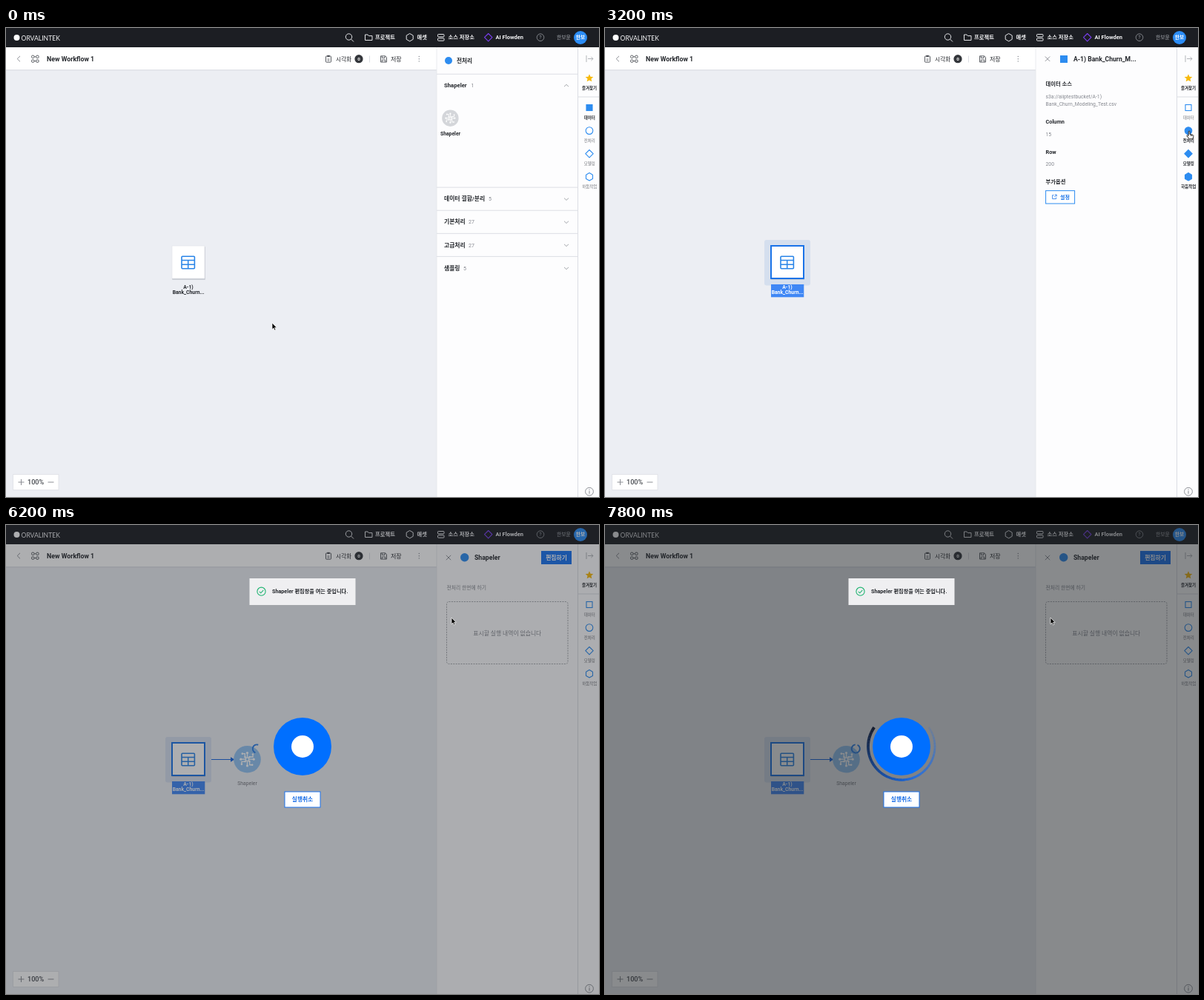
An HTML page that plays this animation: 800x633 px, repeating every 8000 ms.

```html
<!DOCTYPE html>
<html lang="ko">
<head>
<meta charset="utf-8">
<title>Workflow</title>
<style>
html, body { margin: 0; width: 100%; height: 100%; overflow: hidden; background: #eceef3; }
svg { display: block; width: 100vw; height: 100vh; }
text { font-family: Roboto, "Noto Sans CJK KR", "Noto Sans CJK JP", "Noto Sans CJK", sans-serif; white-space: pre; }
</style>
</head>
<body>
<svg id="stage" viewBox="0 0 800 633"></svg>
<script>
const BLUE = '#2d8cf0', DEEP = '#1a73e8', INK = '#24272c', GRAY = '#85888f', LINE = '#dcdee4';
const LOOP = 8000, STEP = 200;
const T = { hover: 1000, select: 1400, leave: 2600, open: 3800, suggest: 4000, tip: 5000, load: 6200, spin: 6400 };
const TOOL = 'Shapeler';

// Markup helpers
const text = (x, y, s, size, fill = INK, weight = 400, anchor = 'start') =>
  `<text x="${x}" y="${y}" font-size="${size}" fill="${fill}" font-weight="${weight}" text-anchor="${anchor}">${s}</text>`;
const bold = (x, y, s, size = 7.7, fill = INK, anchor) => text(x, y, s, size, fill, 700, anchor);
const rect = (x, y, w, h, fill, more = '') =>
  `<rect x="${x}" y="${y}" width="${w}" height="${h}" fill="${fill}" ${more}/>`;
const dot = (x, y, r, fill, more = '') => `<circle cx="${x}" cy="${y}" r="${r}" fill="${fill}" ${more}/>`;
const path = (d, stroke, w = 1, fill = 'none', more = '') =>
  `<path d="${d}" stroke="${stroke}" stroke-width="${w}" fill="${fill}" ${more}/>`;
const line = (c, w = 1) => `stroke="${c}" stroke-width="${w}"`;
const group = (id, body, more = '') => `<g id="${id}" ${more}>${body}</g>`;
const poly = (x, y, r, n, stroke, fill = 'none', w = 1) => {
  const pts = Array.from({ length: n }, (_, i) => {
    const a = i * 2 * Math.PI / n - Math.PI / 2;
    return `${(x + r * Math.cos(a)).toFixed(2)} ${(y + r * Math.sin(a)).toFixed(2)}`;
  });
  return path(`M${pts.join('L')}Z`, stroke, w, fill, 'stroke-linejoin="round"');
};
const cross = (x, y, r, c) => path(`M${x - r} ${y - r}l${2 * r} ${2 * r}m0 ${-2 * r}l${-2 * r} ${2 * r}`, c, .9);

// Small node lattice used for the tool
function lattice(x, y, s) {
  let out = '';
  for (let i = 0; i < 4; i++) {
    out += `<g transform="translate(${x} ${y}) rotate(${i * 90}) scale(${s})">` +
      path('M0 -1.6V-5.5M2.2 -2.2H5.2V-4', '#fff', .9) +
      dot(0, -6, 1.1, '#fff') + dot(5.2, -4.6, .9, '#fff') + dot(2, -2, .9, '#fff') + '</g>';
  }
  return out + rect(x - 1.4 * s, y - 1.4 * s, 2.8 * s, 2.8 * s, 'none', line('#fff', .8 * s));
}

function header() {
  const w = '#e4e5e8';
  return rect(0, 0, 800, 26, '#1c1e23') +
    dot(14.5, 13, 4, '#fff') +
    `<text x="20.5" y="16.8" font-size="8.6" fill="#f4f4f6" style="font-family:Lato,sans-serif">ORVALINTEK</text>` +
    dot(462.5, 12, 4.2, 'none', line(w)) + path('M465.6 15.1l3.4 3.4', w) +
    path('M484.5 16.5v-7.5h3.5l1.4 1.6h4.6v5.9z', w, 1, 'none', 'stroke-linejoin="round"') +
    bold(498, 15.2, '프로젝트', 7.3, '#f4f4f6') +
    poly(544.7, 12.7, 5.2, 6, w) + bold(554.5, 15.2, '애셋', 7.3, '#f4f4f6') +
    rect(582.5, 8.5, 8.5, 3.4, 'none', `rx=".8" ${line(w)}`) +
    rect(582.5, 13.8, 8.5, 3.4, 'none', `rx=".8" ${line(w)}`) +
    bold(596.5, 15.2, '소스 저장소', 7.3, '#f4f4f6') +
    poly(650.7, 12.7, 5.2, 4, '#7a3ff0', 'none', 1.1) + bold(660.5, 15.2, 'AI Flowden', 7.5, '#f4f4f6') +
    dot(721, 12.7, 4.8, 'none', line('#8b8e94', .9)) + text(721, 15.2, '?', 7, '#8b8e94', 400, 'middle') +
    text(743, 15.2, '한보윤', 6.8, '#a4a7ad') +
    dot(775, 13, 9, '#2b8cf5') + bold(775, 15.3, '한보', 6.7, '#fff', 'middle');
}

function toolbar() {
  const g = '#4a4d53';
  let boxes = '';
  for (const [x, y] of [[36.3, 38.8], [42.4, 38.8], [36.3, 44.6], [42.4, 44.6]])
    boxes += rect(x - 1.7, y - 1.7, 3.4, 3.4, 'none', `rx="1.2" ${line(g, .9)}`);
  return rect(0, 26, 581, 31, '#fff') + rect(0, 56.3, 581, 1, '#d5d8df') +
    path('M19 37.8l-3.8 3.8 3.8 3.8', '#8b8e94') + boxes + path('M38 38.8h2.6M38 44.6h2.6', g, .8) +
    bold(55, 44.7, 'New Workflow 1', 8.8) +
    rect(431.5, 38, 7, 8.2, 'none', `rx=".8" ${line(g, .9)}`) + rect(433.3, 36.8, 3.4, 2.2, g) +
    path('M433.5 42h3M433.5 44h3', g, .8) + text(445, 44.5, '시각화', 7.6, INK, 500) +
    dot(476, 41.7, 5.6, '#33363b') + bold(476, 44, '0', 6.2, '#fff', 'middle') +
    rect(490, 37.5, 1, 9, LINE) +
    path('M505.5 37.8h6.2l1.8 1.8v6.4h-8zM507.3 38v2.4h3.8v-2.4M507.3 46v-3h4.4v3', g, .9) +
    text(519, 44.5, '저장', 8, INK, 500) +
    dot(557.3, 38.5, .7, GRAY) + dot(557.3, 41.7, .7, GRAY) + dot(557.3, 44.9, .7, GRAY) +
    rect(9.5, 602.5, 61.5, 21, '#fff', line('#e2e4e9')) +
    path('M16.5 613h8M20.5 609v8M56.5 613h8', '#8b8e94') + text(29, 616.2, '100%', 9.1, '#45484e', 500);
}

function dataNode() {
  return group('halo', rect(215, 286, 62, 61.5, '#d5dfee', 'rx="3"')) +
    rect(224, 295, 45, 45, '#b9bdc6', 'opacity=".65" rx="1"') +
    rect(224, 294, 44, 44, '#fff', 'id="card"') +
    rect(237, 308.2, 17.4, 16.6, 'none', `rx="1" ${line('#2a85e8', 1.6)}`) +
    path('M237 313.4h17.4M237 319.2h17.4M245.7 313.4v11.4', '#2a85e8', 1.5) +
    group('ports', rect(224.3, 313.3, 2.8, 6.4, '#fff', line('#5b9ff0', .8)) +
      rect(265, 313.3, 2.8, 6.4, '#fff', line('#5b9ff0', .8))) +
    group('plate', rect(224, 346, 44.3, 17.3, '#3f87f5')) +
    group('caption', bold(246, 352, 'A-1)', 6.8, 'inherit', 'middle') + bold(246, 358.9, 'Bank_Churn...', 6.8, 'inherit', 'middle'));
}

const edge = c => path('M269 316.5h35', c, 1.2) + path('M303 313.2l5.3 3.3-5.3 3.3z', 'none', 0, c);

function nextNodes() {
  const disc = dot(325.5, 316.2, 18.3, '#92c3f2');
  return group('ghost', edge('#a2a5aa') + disc +
      rect(319.3, 308.8, 12.4, 5.6, 'none', `rx="1" ${line('#fff', 1.2)}`) +
      path('M327 318.2h-6.7q-1 0-1 1v3.6q0 1 1 1h6.2', '#fff', 1.2) + cross(331, 321.8, 2.2, '#fff')) +
    group('added', edge('#1565e0') + disc + lattice(325.5, 316.2, 1.45) +
      text(325.5, 351.3, TOOL, 6.8, '#73767c', 400, 'middle') +
      path('', '#2b7fe8', 1.9, 'none', 'id="busy"'));
}

function toolPanel() {
  const rows = [['데이터 결합/분리', 5, 651], ['기본처리', 27, 624], ['고급처리', 27, 624], ['샘플링', 5, 617]];
  const chev = (y, d) => path(`M753 ${y - d}l3 ${2 * d} 3 ${-2 * d}`, '#9a9da3', .9);
  let out = dot(597, 44, 5, BLUE) + bold(608, 46.7, '전처리', 7.6) + rect(581, 61.7, 190, 1, LINE) +
    bold(591, 80.2, TOOL) + text(627.5, 80.2, 1, 7, GRAY) + chev(77.7, -1.4) +
    dot(599.4, 121.7, 11.2, '#d4d6da', 'id="toolDisc"') + lattice(599.4, 121.7, 1) +
    bold(599.5, 144.5, TOOL, 6.8, INK, 'middle');
  rows.forEach(([name, n, x], i) => {
    const y = 215 + i * 31.1;
    out += rect(581, y - .4, 190, 1, LINE) + bold(591, y + 18.3, name, 7.8) +
      text(x, y + 18.3, n, 7, GRAY) + chev(y + 16, 1.4);
  });
  return out;
}

function dataPanel() {
  const fields = [['데이터 소스', 78], ['Column', 129], ['Row', 169.6], ['부가옵션', 210]];
  const values = [['s3a://aiiptestbucket/A-1)', 95], ['Bank_Churn_Modeling_Test.csv', 105.2], ['15', 145.6], ['200', 186.3]];
  return cross(597, 41.7, 3.2, GRAY) + rect(614, 37, 10, 10, BLUE) + bold(632, 44.7, 'A-1) Bank_Churn_M...', 8.6) +
    fields.map(([s, y]) => bold(594.5, y, s, 7.3)).join('') +
    values.map(([s, y]) => text(594.5, y, s, 6.8, GRAY)).join('') +
    rect(594.6, 219.6, 39, 17.4, '#fff', line(BLUE)) +
    path('M605.6 225.6h-2v5h5v-2M606.4 228l2.6-2.7M606.8 225h2.4v2.4', DEEP, .8) + bold(614, 230.7, '설정', 7, DEEP);
}

function editPanel() {
  return cross(597, 44, 3.2, GRAY) + dot(618.7, 43.8, 5.7, BLUE) + bold(632, 46.8, TOOL, 8.7) +
    rect(722, 35, 41, 18, '#1a73f0') + bold(742.5, 46.8, '편집하기', 7.8, '#fff', 'middle') +
    text(594.5, 87.4, '전처리 한번에 하기', 6.8, GRAY) +
    rect(594.5, 103.5, 163.5, 84, 'none', `rx="3" stroke-dasharray="2 1.4" ${line('#9a9da3', .9)}`) +
    text(676.3, 148.7, '표시할 실행 내역이 없습니다', 7.8, GRAY, 400, 'middle');
}

function sidebar() {
  let star = 'M';
  for (let i = 0; i < 10; i++) {
    const a = i * Math.PI / 5 - Math.PI / 2, r = i % 2 ? 2.6 : 5.6;
    star += `${i ? 'L' : ''}${(787 + r * Math.cos(a)).toFixed(2)} ${(67.8 + r * Math.sin(a)).toFixed(2)}`;
  }
  return rect(771, 26, 1, 607, LINE) +
    path('M783 37v9M785 41.5h7M789.4 38.9l2.6 2.6-2.6 2.6', '#a9acb2', .9) +
    path(star + 'Z', 'none', 0, '#f7b90c') + bold(787, 82.6, '즐겨찾기', 5.5, INK, 'middle') +
    rect(772, 92.5, 28, 1, LINE) + group('kinds', '') +
    dot(787, 625.7, 5.4, 'none', line(GRAY, .9)) + path('M787 624.7v4M787 622.4v1.2', GRAY);
}

function kinds(on) {
  const names = ['데이터', '전처리', '모델링', '하둡작업'];
  return names.map((name, i) => {
    const y = 107.5 + 31.1 * i, fill = on[i] ? BLUE : '#fff';
    const shape = i === 0 ? rect(783, y - 4, 8, 8, fill, line(BLUE, 1.1))
      : i === 1 ? dot(787, y, 4.8, fill, line(BLUE, 1.1))
      : poly(787, y, 5.2, i === 2 ? 4 : 6, BLUE, fill, 1.1);
    return shape + text(787.3, y + 15.4, name, 5.5, on[i] ? INK : '#6f7278', on[i] ? 700 : 400, 'middle');
  }).join('');
}

function overlays() {
  return group('tip', path('M600 161.5l3-4.5 3 4.5z', 'none', 0, '#30363b') + rect(558, 161, 94, 31, '#30363b') +
      text(564.5, 173.7, '전처리 한번에 하기', 6.8, '#dfe1e4')) +
    rect(0, 0, 800, 633, '#212529', 'id="dim"') +
    group('loader', rect(328.5, 72, 143, 36, '#efeff1') + dot(344.5, 89.7, 5.6, 'none', line('#22b573', 1.1)) +
      path('M341.8 89.8l2 2 3.5-3.9', '#22b573', 1.1) +
      bold(359, 92.3, TOOL + ' 편집창을 여는 중입니다.', 7.2) +
      group('ring', '') + dot(400, 299, 39, '#006fff') + dot(400, 299, 15, '#fff') +
      rect(376, 360, 48, 21, '#fff', line('#1a73f0')) + bold(400, 373.4, '실행취소', 7.7, '#1a6fe8', 'middle'));
}

const cursors =
  group('arrow', path('M0 0V8.8L2 7 3.4 10 4.9 9.3 3.5 6.4H6.2Z', '#fff', .7, '#000')) +
  group('hand', path('M-.8 .5C-.8 -.8 1 -.8 1 .5V4L4.6 4.7C5.7 5 6 5.6 5.8 6.8L5 10.3H.5L-3 6.4C-3.4 5.3-2.2 4.8-1.6 5.5L-.8 6.2ZM2.4 4.4v1.8M4 4.7v1.6', '#111', .9, '#fff'));

const stage = document.getElementById('stage');
stage.innerHTML = rect(0, 0, 800, 633, '#eceef3') + toolbar() + nextNodes() + dataNode() +
  rect(581, 26, 219, 607, '#fdfdfe') + rect(580.6, 26, .8, 607, '#e3e5ea') + header() +
  group('tools', toolPanel()) + group('info', dataPanel()) + group('edit', editPanel()) + sidebar() +
  overlays() + group('cursor', cursors);

const el = Object.fromEntries([...stage.querySelectorAll('[id]')].map(e => [e.id, e]));
const show = (id, on) => { el[id].style.display = on ? '' : 'none'; };
const at = (cx, cy, r, deg) => {
  const a = deg * Math.PI / 180;
  return `${(cx + r * Math.cos(a)).toFixed(2)} ${(cy + r * Math.sin(a)).toFixed(2)}`;
};
const arc = (cx, cy, r, a, b) => `M${at(cx, cy, r, a)}A${r} ${r} 0 ${b - a > 180 ? 1 : 0} 1 ${at(cx, cy, r, b)}`;

// Tail of the loading ring fades from navy to clear blue
function ring(head) {
  const n = 50, sweep = 250;
  let out = '';
  for (let i = 0; i < n; i++) {
    const k = i / n, m = Math.min(1, k * 1.7), end = head - k * sweep;
    const mix = (a, b) => Math.round(a + (b - a) * m);
    const alpha = k < .5 ? 1 : 1 - (k - .5) * 1.8;
    out += path(arc(400, 299, 45, end - sweep / n - .3, end), `rgb(${mix(22, 26)},${mix(30, 108)},${mix(48, 232)})`,
      4 - 1.5 * k, 'none', `opacity="${alpha.toFixed(2)}"`);
  }
  return out;
}

// Pointer moves: start, end, target
const moves = [[200, 1000, 252.5, 319], [2400, 3200, 788, 139.5], [4000, 5200, 601, 125]];
function pointer(t) {
  let x = 359, y = 398;
  for (const [a, b, tx, ty] of moves) {
    const k = Math.max(0, Math.min(1, (t - a) / (b - a))), e = k * k * (3 - 2 * k);
    x += (tx - x) * e;
    y += (ty - y) * e;
  }
  return [x, y];
}

function draw(t) {
  const picked = t >= T.select, opened = t >= T.open, loading = t >= T.load, spinning = t >= T.spin;
  show('halo', picked);
  show('plate', picked);
  show('ports', t >= T.hover && t < T.leave);
  el.card.setAttribute('stroke', picked ? DEEP : '#dfe2e8');
  el.card.setAttribute('stroke-width', picked ? 2 : .6);
  el.caption.setAttribute('fill', picked ? '#fff' : INK);
  el.caption.querySelectorAll('text').forEach(e => e.setAttribute('fill', picked ? '#fff' : INK));
  show('ghost', t >= T.suggest && !loading);
  show('added', loading);
  show('tools', !picked || (opened && !loading));
  show('info', picked && !opened);
  show('edit', loading);
  el.toolDisc.setAttribute('fill', picked ? '#3f95f0' : '#d4d6da');
  el.kinds.innerHTML = kinds(loading ? [0, 0, 0, 0] : picked ? [0, 1, 1, 1] : [1, 0, 0, 0]);
  show('tip', t >= T.tip && !loading);
  show('dim', loading);
  el.dim.setAttribute('opacity', spinning ? .53 : .37);
  show('loader', loading);
  el.ring.innerHTML = spinning ? ring(-37 + (t - T.spin) * .18) : '';
  if (loading) {
    const u = t - T.load, a = 110 + u * .34;
    el.busy.setAttribute('d', arc(338.3, 302, 5.6, a, a + 180 + 150 * Math.sin(u / 1600 * Math.PI / 2) ** 2));
  }
  const [x, y] = pointer(t);
  el.cursor.setAttribute('transform', `translate(${x.toFixed(2)} ${y.toFixed(2)})`);
  const hand = (t >= 3200 && t <= 4000) || (t >= T.tip && !loading);
  show('hand', hand);
  show('arrow', !hand);
}

const start = performance.now();
let last = -1;
function tick() {
  const t = Math.floor(((performance.now() - start) % LOOP) / STEP) * STEP;
  if (t !== last) draw(last = t);
  requestAnimationFrame(tick);
}
tick();
</script>
</body>
</html>
```
